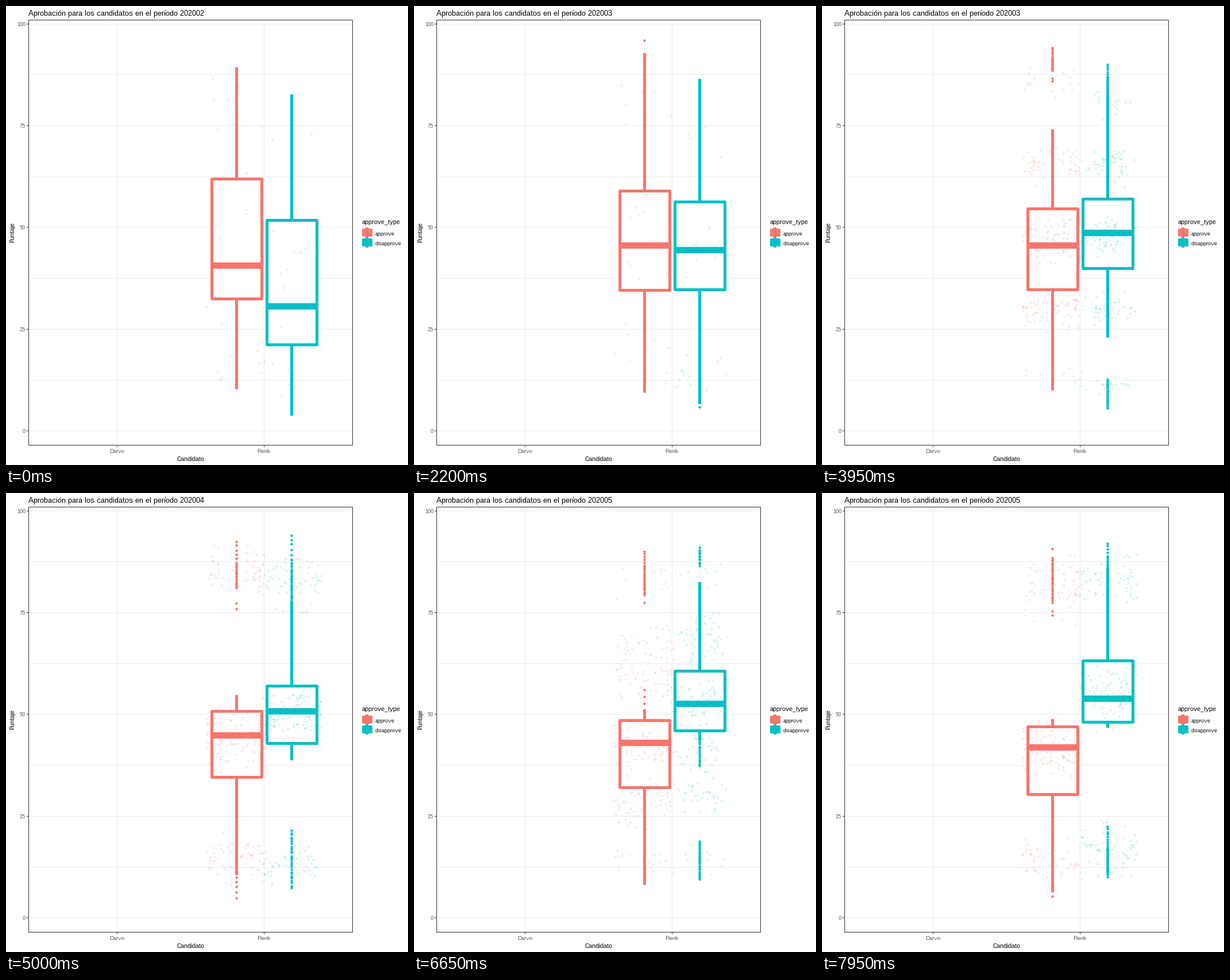
Write a matplotlib script that moves like this. It is 700 px wide and 800 px high and loops after 8 s.

```python
import numpy as np
import matplotlib.pyplot as plt
from matplotlib.animation import FuncAnimation
from matplotlib.patches import FancyBboxPatch, Rectangle

W, H, DPI = 700, 800, 100
PX = 72 / DPI                      # points per pixel
ZERO, UNIT = 740.69, 7.094         # y of value 0, pixels per unit
RED, TEAL, GRID, DARK = "#F8766D", "#00BFC4", "#EBEBEB", "#333333"
HOLD, CYCLE = 8, 50                # frames at rest, frames per month

rng = np.random.default_rng(12)
plt.rcParams.update({"font.family": "Liberation Sans", "path.snap": False,
                     "text.hinting": "native", "text.hinting_factor": 1})
fig = plt.figure(figsize=(W / DPI, H / DPI), dpi=DPI, facecolor="white")
ax = fig.add_axes([0, 0, 1, 1])
ax.set(xlim=(0, W), ylim=(H, 0))
ax.axis("off")


def crisp(y):
    """Centre of the pixel that holds y."""
    return np.floor(y) + 0.5


def line(xs, ys, color, width=1, z=1):
    return ax.plot(xs, ys, color=color, lw=width * PX, zorder=z,
                   solid_capstyle="butt")[0]


def label(x, y, text, size, color="black", **kw):
    return ax.text(x, y, text, fontsize=size * PX, color=color, **kw)


def draw_frame():
    for v in np.arange(0, 101, 12.5):
        y = crisp(ZERO - UNIT * v)
        line([39, 604], [y, y], GRID, z=0)
        if v % 25 == 0:
            line([36, 39], [y, y], DARK)
            label(34, np.floor(y) + 4, f"{v:.0f}", 9, "#4D4D4D", ha="right")
    for x, name in ((193.5, "Darvo"), (449.5, "Flenk")):
        line([x, x], [25, 765], GRID, z=0)
        line([x, x], [766, 769], DARK)
        label(x - 0.7, 779, name, 9, "#4D4D4D", ha="center")
    ax.add_patch(Rectangle((39.5, 24.5), 564, 741, fill=False, ec=DARK,
                           lw=PX, zorder=8))
    label(321, 793, "Candidato", 11, ha="center")
    label(11.5, 395, "Puntaje", 11, ha="center", va="center", rotation=90)


def draw_legend():
    label(620, 380, "approve_type", 11)
    for name, color, y in (("approve", RED, 388), ("disapprove", TEAL, 405)):
        ax.add_patch(FancyBboxPatch((622, y + 2), 14, 10, fc=color, ec=color, lw=0,
                                    boxstyle="round,pad=2,rounding_size=2"))
        line([628.5, 628.5], [y - 2, y + 16], color, 5)
        label(643, y + 12, name, 9)


def cloud(x, high, middle, low):
    """Points at x, a quarter around high, half around middle, a quarter around low.

    Each level is a (mean, deviation) pair.
    """
    levels = np.array([high, middle, low])
    mean, sd = levels[rng.choice(3, len(x), p=[.25, .5, .25])].T
    v = mean + sd * np.clip(rng.normal(size=len(x)), -2.3, 2.3)
    return np.column_stack([x, ZERO - UNIT * v])


def runs(*spans):
    """Slightly uneven rows of heights, one per (first, last, count)."""
    return np.concatenate([np.linspace(a, b, n) + rng.uniform(-1, 1, n)
                           for a, b, n in spans])


def chain(states):
    return list(zip(states, states[1:]))


class Group:
    def __init__(self, color, mid, boxes, dots, outliers):
        self.boxes, self.dots, self.outliers = chain(np.array(boxes)), dots, outliers
        self.mid = mid
        self.out = ax.scatter([], [], s=(4.4 * PX) ** 2, c=color, lw=0, zorder=2)
        self.upper = line([mid, mid], [0, 0], color, 5, 3)
        self.lower = line([mid, mid], [0, 0], color, 5, 3)
        self.box = ax.add_patch(Rectangle((mid - 43, 0), 87, 1, fc="white", ec=color,
                                          lw=5 * PX, joinstyle="round", zorder=4))
        self.median = line([mid - 43, mid + 44], [0, 0], color, 11, 5)
        self.pts = ax.scatter([], [], s=(3.2 * PX) ** 2, facecolor=color,
                              edgecolor=color, lw=0.8 * PX, alpha=0.12, zorder=6)

    def update(self, seg, t):
        def mix(pairs):
            start, end = pairs[seg]
            return start + (end - start) * t

        top, q3, med, q1, bottom = crisp(mix(self.boxes))
        self.upper.set_ydata([top - 0.5, q3])
        self.lower.set_ydata([q1, bottom - 0.5])
        self.box.set_y(q3)
        self.box.set_height(q1 - q3)
        self.median.set_ydata([med, med])
        self.pts.set_offsets(mix(self.dots))
        ys = mix(self.outliers) if seg or t else np.empty(0)
        self.out.set_offsets(np.column_stack([np.full(len(ys), self.mid - 0.3), ys]))


def dots(left, right, few, many, keep_x, first, second, *later):
    """A few points in the first month, many from the second one on."""
    def column(n):
        return rng.uniform(left, right, n)

    x = column(few + many)
    start = cloud(x[:few], *first)
    x = x if keep_x else column(few + many)
    full = [cloud(x, *second)]
    for levels in later:
        full.append(cloud(x if keep_x else column(len(x)), *levels))
    return [(start, full[0][:few])] + chain(full)


def outliers(single, second, third, fourth):
    one = np.array([single])
    return [(one, one), (second, third), (third, fourth), (fourth, fourth)]


draw_frame()
draw_legend()
title = label(39, 17, "", 13)

red_last = ((82, 3.6), (41.5, 3.2), (13.5, 3.2))
red_dots = dots(349, 453, 30, 200, True,
                ((80, 6), (45, 8), (18, 4)),
                ((86, 2.3), (46, 3.5), (15, 2.5)),
                ((85.5, 2.6), (44, 3.6), (15, 3)), red_last, red_last)
red_out = outliers(60.0, np.full(32, 60.0),
                   runs((705, 669, 5), (85, 114, 5), (122, 165, 20), (193, 203, 2)),
                   runs((97, 150, 3), (206, 212, 2), (112, 190, 26), (703, 703, 1)))

teal_last = ((84.5, 3.2), (54.5, 3.6), (16, 2.9))
teal_dots = dots(447, 550, 26, 200, False,
                 ((55, 10), (30, 8), (9, 2)),
                 ((79, 3), (46.5, 3), (10.5, 2)),
                 ((82, 3.6), (50.5, 3), (13, 2.2)), teal_last, teal_last)
teal_out = outliers(699.0, np.repeat([130.0, 715.0], [33, 26]),
                    runs((73, 116, 6), (118, 190, 27), (588, 688, 26)),
                    runs((110, 131, 8), (87, 104, 4), (581, 670, 21), (620, 663, 26)))

# whisker top, upper hinge, median, lower hinge, whisker bottom per month
red_boxes = [(107, 301.5, 452.5, 510.5, 668), (78, 326.5, 411.5, 493, 675),
             (352, 380.5, 422.5, 495.5, 666), (394, 407.5, 443.5, 525.5, 696)]
teal_boxes = [(154, 373.5, 523.5, 590.5, 714), (122.6, 336, 409.5, 478.5, 691),
              (190, 336.5, 380.5, 436.5, 466), (132, 292.5, 358.5, 399.5, 409)]

groups = [Group(RED, 401.5, red_boxes + red_boxes[-1:], red_dots, red_out),
          Group(TEAL, 497.5, teal_boxes + teal_boxes[-1:], teal_dots, teal_out)]


def update(i):
    seg, step = divmod(i, CYCLE)
    t = max(0, (step - HOLD) / (CYCLE - HOLD))
    title.set_text("Aprobación para los candidatos en el período "
                   f"20200{2 + seg + (t > 0.5)}")
    for g in groups:
        g.update(seg, t)
    return []


anim = FuncAnimation(fig, update, frames=160, interval=50, repeat=True,
                     repeat_delay=0, init_func=lambda: update(0))
plt.show()
```
